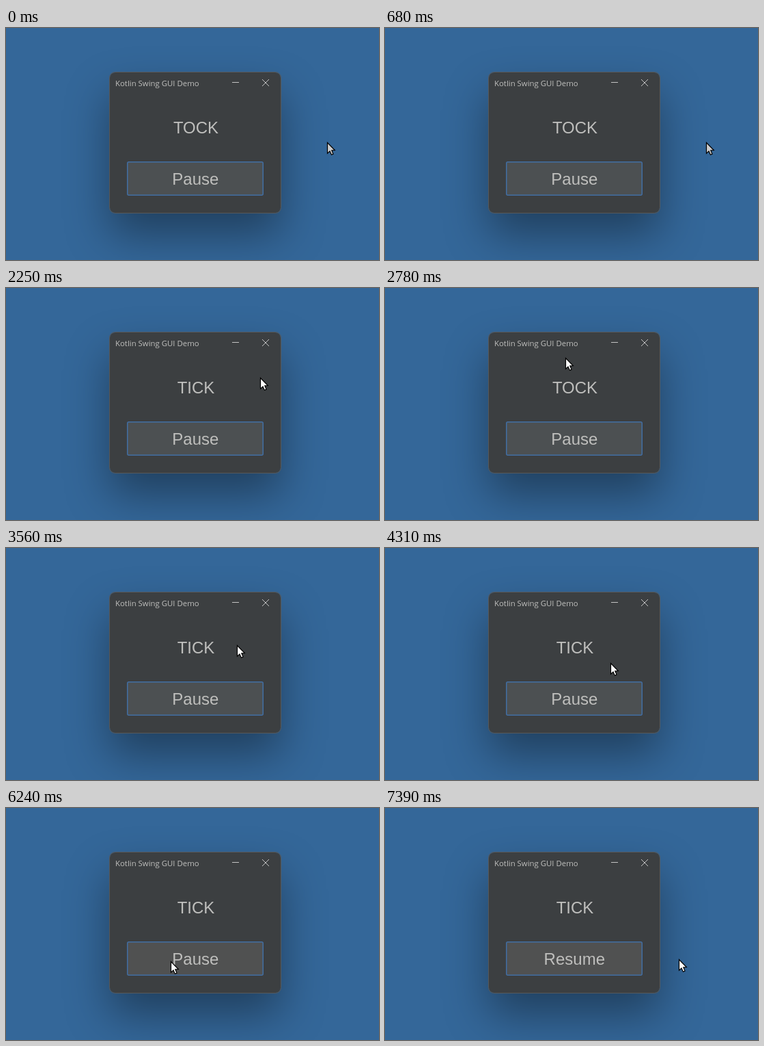
Recreate the animation shown at these times as an HTML page with a canvas. Size 546 px wide and 339 px high, loop 8000 ms.

```html
<!DOCTYPE html>
<html lang="en">
<head>
<meta charset="utf-8">
<title>Swing demo</title>
<style>
  html, body { margin: 0; width: 100%; height: 100%; overflow: hidden; background: #346799; }
  canvas { display: block; }
</style>
</head>
<body>
<canvas id="stage" width="546" height="339"></canvas>
<script>
const ctx = document.getElementById("stage").getContext("2d");
const LOOP = 8000;
const FIRST_FLIP = 130, FLIP_EVERY = 509;
const WAKE_AT = 1520, MOVE_AT = 1920, HOVER_AT = 5640, PAUSE_AT = 6440;
const SWIRL = { start: 2780, end: 4310 };

// Straight pointer moves, each from wherever the pointer was before.
const GLIDES = [
  { start: MOVE_AT, end: 2250, to: [372, 132] },
  { start: 2380, end: SWIRL.start, to: [264, 103] },
  { start: SWIRL.end, end: 4440, to: [347, 158] },
  { start: 5430, end: 5780, to: [241, 225] },
  { start: 7180, end: 7390, to: [430, 222] }
];

const progress = (t, { start, end }) => Math.max(0, Math.min(1, (t - start) / (end - start)));
const ease = u => (1 - Math.cos(Math.PI * u)) / 2;

// Two turns around a centre that drifts right.
function swirl(u) {
  const angle = (93.5 + 586 * u ** 1.17) * Math.PI / 180;
  return [268 + 14 * u + 63 * Math.cos(angle), 143 - 40 * Math.sin(angle)];
}

function pointerAt(t) {
  let pos = t < WAKE_AT ? [470, 168] : [469, 167];
  for (const glide of GLIDES) {
    if (t < glide.start) break;
    if (glide.start === SWIRL.end) pos = swirl(1);
    const u = ease(progress(t, glide));
    pos = pos.map((p, axis) => p + (glide.to[axis] - p) * u);
  }
  if (t >= SWIRL.start && t < SWIRL.end) pos = swirl(progress(t, SWIRL));
  return pos.map(Math.round);
}

function line(x1, y1, x2, y2) {
  ctx.beginPath();
  ctx.moveTo(x1, y1);
  ctx.lineTo(x2, y2);
  ctx.stroke();
}

function text(str, x, y, font, align) {
  ctx.font = font;
  ctx.textAlign = align;
  ctx.fillStyle = "#bfbfbd";
  ctx.fillText(str, x, y);
}

function roundBox(x, y, w, h, r) {
  ctx.beginPath();
  ctx.roundRect(x, y, w, h, r);
}

function drawWindow() {
  ctx.save();
  ctx.shadowColor = "rgba(0,0,0,0.38)";
  ctx.shadowOffsetY = 32;
  ctx.shadowBlur = 64;
  ctx.fillStyle = "#3c3f41";
  roundBox(152, 65, 250, 205, 8);
  ctx.fill();
  ctx.restore();
  ctx.strokeStyle = "#56595b";
  ctx.lineWidth = 1;
  roundBox(151.5, 64.5, 251, 206, 8);
  ctx.stroke();

  text("Kotlin Swing GUI Demo", 160, 85, '11.4px "Open Sans", sans-serif', "left");
  ctx.strokeStyle = "#c4c4c4";
  line(331, 79.5, 341, 79.5);
  line(375, 75, 385, 85);
  line(385, 75, 375, 85);
}

function drawButton(t) {
  ctx.fillStyle = t < HOVER_AT ? "#4c5052" : "#505151";
  roundBox(177.75, 195.75, 198.5, 48.5, 2);
  ctx.fill();
  ctx.strokeStyle = "#416ea3";
  ctx.lineWidth = 1.5;
  ctx.stroke();
}

function drawPointer(x, y, fill) {
  const outline = [[0.5, -0.5], [0.5, 15.2], [4, 12], [6.4, 17.2], [9, 16.1], [6.8, 10.8], [11.3, 10.5]];
  ctx.beginPath();
  for (const [dx, dy] of outline) ctx.lineTo(x + dx, y + dy);
  ctx.closePath();
  ctx.fillStyle = fill;
  ctx.fill();
  ctx.strokeStyle = "#000000";
  ctx.lineWidth = 1.2;
  ctx.stroke();
}

function draw(t) {
  const font = '24px "Liberation Sans", Arial, sans-serif';
  const flips = Math.floor((Math.min(t, PAUSE_AT) - FIRST_FLIP) / FLIP_EVERY) + 1;
  ctx.fillStyle = "#346799";
  ctx.fillRect(0, 0, 546, 339);
  drawWindow();
  text(flips % 2 ? "TICK" : "TOCK", 278, 154, font, "center");
  drawButton(t);
  text(t < PAUSE_AT ? "Pause" : "Resume", 277.3, 229, font, "center");
  drawPointer(...pointerAt(t), t < WAKE_AT ? "#cdcdcd" : t < MOVE_AT ? "#e8e8e8" : "#ffffff");
}

function tick() {
  draw(performance.now() % LOOP);
  requestAnimationFrame(tick);
}
tick();
</script>
</body>
</html>
```
